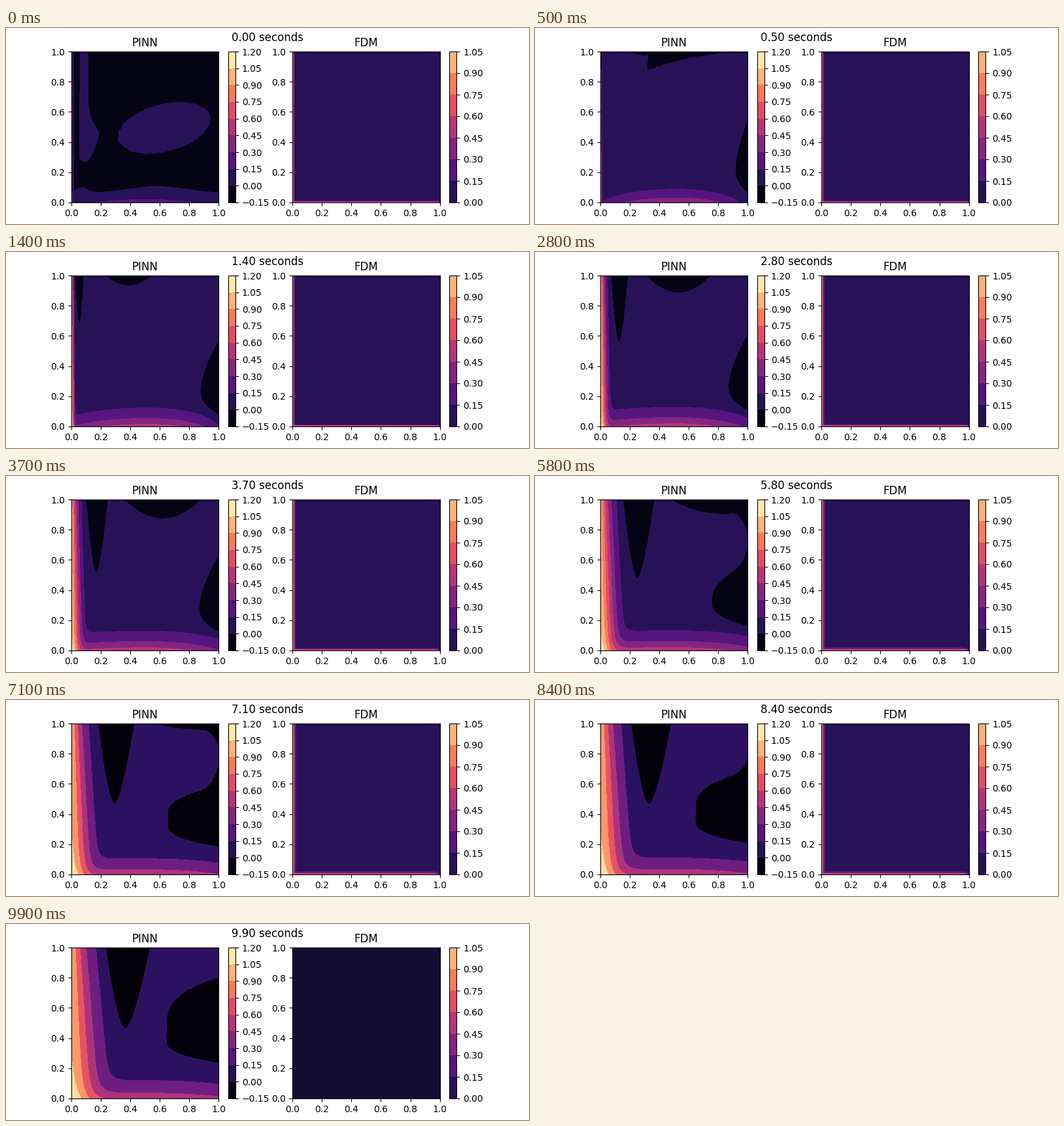
A matplotlib script for the animation above (10000 ms loop, 800 px wide and 300 px high).

```python
import numpy as np
import matplotlib.pyplot as plt
from matplotlib.animation import FuncAnimation
from matplotlib.colors import Normalize

FRAMES = 100
NORM = Normalize(-0.125, 1.185)
CMAP = plt.get_cmap("magma")
COARSE_AFTER = 5.9  # time at which the level step widens from 0.15 to 0.2

X, Y = np.meshgrid(np.linspace(0, 1, 226), np.linspace(0, 1, 232))
GX, GY = np.meshgrid(np.linspace(0, 1, 101), np.linspace(0, 1, 101))
NOISE = np.random.default_rng(4).normal(0, 1, X.shape)

FINE = np.arange(-1, 9) * 0.15
COARSE = np.arange(-1, 7) * 0.2
FDM_LEVELS = np.arange(0, 8) * 0.15


def bell(x, center, width):
    return np.exp(-((x - center) / width) ** 2)


def ramp(x, start, end):
    return np.clip((x - start) / (end - start), 0, 1)


def layers(t):
    """Positive part of the field: the two boundary layers."""
    warm = 1 - 0.55 * np.exp(-t / 0.5)

    width = max(1.5, 4 * t - 2) / 225.5 * (1 + 0.55 * (1 - Y))
    power = 1.5 - 0.37 * Y ** 2
    left = warm * (0.975 + 0.145 * np.exp(-Y / 0.15))
    left = left * np.exp(-1.59 * (X / width) ** power)

    sag_left = 0.45 * np.exp(-t / 2.3) * ramp(X, 0.52, 0) ** 2
    sag_right = (0.06 + 0.45 * np.exp(-t / 4)) * ramp(X, 0.52, 1) ** 2
    decay = (0.1 + 0.02 * (t / 10) ** 4) * (1 - 0.6 * np.exp(-t / 0.4))
    bottom = warm * (0.54 - sag_left - sag_right) * np.exp(-Y / decay)

    return np.maximum((left ** 2.5 + bottom ** 2.5) ** 0.4, 0.01)


def opening(t):
    """Positive islands of the first moment, which spread over the square."""
    band = 0.065 + 0.045 * bell(X, 0.58, 0.28) + 0.035 * bell(X, 0.07, 0.06) - Y
    finger = np.minimum.reduce([
        X - 0.046 - 0.01 * Y,
        0.118 + 0.08 * bell(Y, 0.43, 0.11) - X,
        Y - 0.264 - 18 * (X - 0.09) ** 2])
    a = np.radians(14)
    dx, dy = X - 0.63, Y - 0.494
    rho = np.hypot((dx * np.cos(a) + dy * np.sin(a)) / 0.325,
                   (dy * np.cos(a) - dx * np.sin(a)) / 0.16)
    lens = 0.16 * (1 - rho) + 0.002 * NOISE
    return np.maximum.reduce([band, finger, lens, 0.02 - X]) + 0.6 * t


def wedge(t):
    """Tongue that hangs from the top edge and drifts to the right."""
    tip_x = 0.6 * (1 - np.exp(-t / 9.2)) - 0.03
    tip_y = 0.465 + 0.5 * np.exp(-t / 1.7)
    left, right = 0.68 * tip_x - 0.012, 1.45 * tip_x
    mid = tip_x + ((left + right) / 2 - tip_x) * ramp(Y, tip_y, 1)
    half = max((right - left) / 2, 0.01)
    return tip_y + (1 - tip_y) * (np.abs(X - mid) / half) ** 1.55 - Y


def cap(t):
    """Arc that sweeps along the top edge, then a drop in the corner."""
    depth = 0.125 * max(np.sin(np.pi * t / 8), 0)
    arc = depth * (1 - ((X - 0.25 - 0.1 * t) / (0.09 + 0.045 * t)) ** 2)
    swell = max(np.sin(np.pi * ramp(t, 3.6, 8.2)), 0)
    return 1.002 - Y - arc - 0.15 * swell * ramp(X, 0.9, 1) ** 2


def lobe(t):
    """Bulge that grows in from the right edge."""
    grown = 1 / (1 + np.exp((5.8 - t) / 0.4))
    tip_x = 0.87 - 0.225 * grown + 0.13 * np.exp(-t / 0.5)
    tip_y = 0.21 + 0.02 * t
    kick = 0.054 * grown * (9.9 - t)
    upper = 0.53 + 0.027 * t - kick
    lower = 0.055 + 0.0185 * t
    r = ramp(X, tip_x, 1)
    top = tip_y + (upper - tip_y) * r ** (0.65 - 0.38 * grown) + kick * r ** 8
    low = tip_y - (tip_y - lower) * r ** (0.45 - 0.13 * grown)
    rough = 0.003 * grown * NOISE * (Y > tip_y)
    return np.maximum.reduce([Y - top, low - Y, tip_x - X]) + 0.001 + rough


def sign_field(t):
    """Below zero where the solution is negative."""
    return np.minimum.reduce([opening(t), wedge(t), cap(t), lobe(t)])


def fdm(t):
    reach = 0.01 * (0.5 + 0.8 * np.sqrt(t / 9.9))
    left = np.exp(-GX / reach)
    bottom = 0.66 * np.exp(-GY / reach)
    bottom = bottom * (1 - np.exp(-(1 - GX) / (0.001 + 0.0015 * t)))
    return np.maximum(left, bottom) + 0.001


def bands(ax, x, y, z, levels):
    return ax.contourf(x, y, z, levels=levels, cmap=CMAP,
                       vmin=NORM.vmin, vmax=NORM.vmax)


fig, axes = plt.subplots(1, 2, figsize=(8, 3), dpi=100)
pinn_ax, fdm_ax = axes
drawn = [bands(pinn_ax, X, Y, layers(0), FINE),
         bands(fdm_ax, GX, GY, fdm(0), FDM_LEVELS)]
for ax, cs, name in zip(axes, drawn, ("PINN", "FDM")):
    fig.colorbar(cs, ax=ax)
    ax.set_title(name)
clock = fig.suptitle("0.00 seconds")


def draw(i):
    t = i / 10
    while drawn:
        drawn.pop().remove()
    levels = FINE if t < COARSE_AFTER else COARSE
    dark = CMAP(NORM((levels[0] + levels[1]) / 2))
    drawn.append(bands(pinn_ax, X, Y, layers(t), levels))
    drawn.append(pinn_ax.contourf(X, Y, sign_field(t), levels=[-9, 0], colors=[dark]))
    if i < FRAMES - 1:
        drawn.append(bands(fdm_ax, GX, GY, fdm(t), FDM_LEVELS))
    else:  # the solver has no data for the last step
        drawn.append(bands(fdm_ax, GX, GY, 0 * GX, [-0.01, 0.01]))
    for ax in axes:
        ax.set(xlim=(0, 1), ylim=(0, 1))
    clock.set_text(f"{t:.2f} seconds")


anim = FuncAnimation(fig, draw, frames=FRAMES, interval=100, repeat=True)
plt.show()
```
